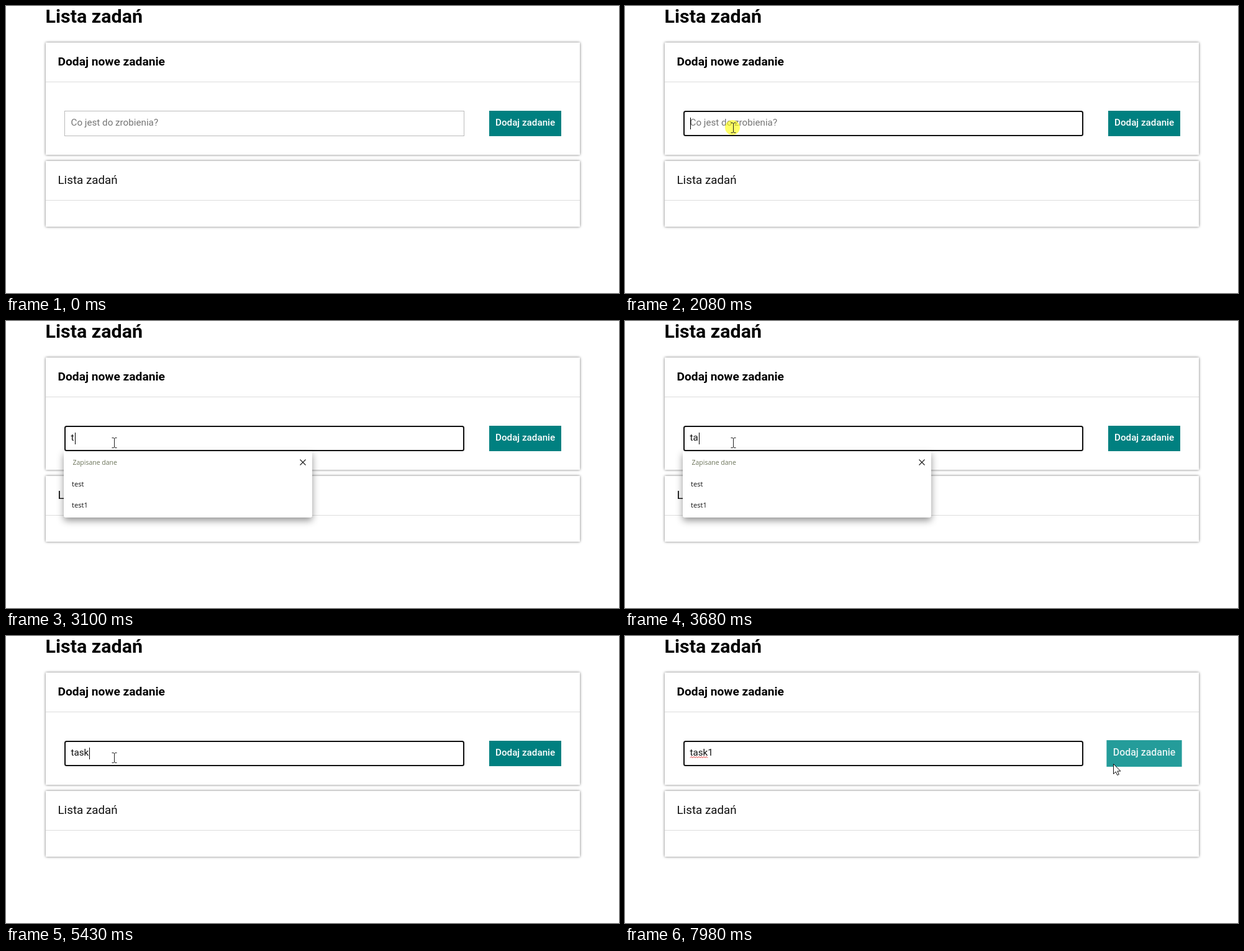
Animation of 987x463 px, one loop 8 s. Source, as an HTML page:

```html
<!DOCTYPE html>
<html lang="pl">
<head>
<meta charset="utf-8">
<title>Lista zadań</title>
<style>
  html, body { margin: 0; width: 100%; height: 100%; overflow: hidden; background: #fff; }
  svg { display: block; width: 987px; height: 463px; font: 15.2px Roboto, sans-serif; }
  .card { fill: #fff; filter: url(#cardShadow); }
  .rule { stroke: #ddd; }
  .popup text { font: 11.2px "Open Sans", sans-serif; fill: #111; }
  .popup .label { font-size: 10.5px; fill: #6c745a; }
</style>
</head>
<body>
<svg viewBox="0 0 987 463">
  <defs>
    <filter id="cardShadow" x="-5%" y="-15%" width="110%" height="130%">
      <feDropShadow dx="0" dy="0" stdDeviation="2" flood-color="#000" flood-opacity=".55"/>
    </filter>
    <filter id="popupShadow" x="-10%" y="-20%" width="120%" height="160%">
      <feDropShadow dx="0" dy="5" stdDeviation="6" flood-color="#000" flood-opacity=".42"/>
    </filter>
  </defs>

  <text x="63.5" y="27" font-size="30.4" font-weight="700">Lista zadań</text>

  <rect class="card" x="64" y="59" width="860" height="181"/>
  <path class="rule" d="M64 122.5H924"/>
  <text x="83.5" y="96" font-size="19.2" font-weight="700">Dodaj nowe zadanie</text>

  <rect class="card" x="64" y="250" width="860" height="106"/>
  <path class="rule" d="M64 313.5H924"/>
  <text x="83.5" y="287" font-size="18.8" fill="#111">Lista zadań</text>

  <rect id="idleBorder" x="94.5" y="169.5" width="643" height="40" fill="none" stroke="#767676" stroke-dasharray="1 1"/>
  <rect id="focusBorder" x="95" y="170" width="642" height="39" rx="2.5" fill="#fff" stroke="#101010" stroke-width="2"/>
  <text id="placeholder" x="104.5" y="193" fill="#757575">Co jest do zrobienia?</text>
  <text id="value" x="104.5" y="193" fill="#111"></text>
  <path id="squiggle" fill="none" stroke="#e02020"/>
  <path id="caret" d="M0 180V199" stroke="#000"/>

  <g id="button">
    <rect id="buttonFace" x="778" y="169" width="116" height="41"/>
    <text id="buttonText" x="788" y="193" font-weight="500" fill="#fff">Dodaj zadanie</text>
  </g>

  <g id="popup" class="popup">
    <path d="M93 210H493V313a4 4 0 0 1-4 4H97a4 4 0 0 1-4-4Z" fill="#fff" filter="url(#popupShadow)"/>
    <text class="label" x="107.5" y="232">Zapisane dane</text>
    <text x="106" y="267">test</text>
    <text x="106" y="301">test1</text>
    <path d="M473.5 223.5l9 9m0-9l-9 9" stroke="#222" stroke-width="1.2"/>
  </g>

  <circle id="halo" cx="173" cy="196" r="12" fill="#ffff00" opacity=".6"/>
  <path id="arrow" d="M.5 .5V16.5L4.2 13 6.7 18.5 9.3 17.3 6.9 12H12Z" fill="#fff" stroke="#111"/>
  <path id="beam" d="M-3.5-7.5H-1L.5-6.5 2-7.5H4.5M-3.5 8.5H-1L.5 7.5 2 8.5H4.5M.5-6.5V7.5" fill="none" stroke="#222"/>
</svg>
<script>
const LOOP = 8000;
const el = Object.fromEntries([...document.querySelectorAll('svg [id]')].map(n => [n.id, n]));

// [start, typed text, caret x or null]
const typing = [
  [0, '', null], [2080, '', 105.5], [2630, '', null],
  [3100, 't', 111.5], [3620, 'ta', 119.5], [3890, 'tas', 126.5],
  [4350, 'task', 134.5], [4880, 'task', null], [5430, 'task', 134.5],
  [5960, 'task1', 141.5], [6550, 'task1', null], [7010, 'task1', 141.5], [7540, 'task1', null]
];

// Stepped pointer moves; each path point is [progress, x, y]
const moves = [
  { start: 460, end: 730, steps: 4, path: [[0, 897, 440], [.4, 840, 387], [.75, 735, 410], [1, 720, 480]] },
  { start: 990, end: 1680, steps: 10, path: [[0, 417, 392], [.3, 315, 309], [.6, 230, 240], [.8, 190, 210], [1, 174, 196]] },
  { start: 7010, end: 7710, steps: 10, path: [[0, 180, 195], [.2, 290, 175], [.4, 456, 166], [.7, 660, 185], [1, 768, 213]] },
  { start: 7910, end: 7980, steps: 1, path: [[0, 777, 208], [1, 786, 206]] }
];

const between = (t, a, b) => t >= a && t < b;
const show = (node, on) => node.setAttribute('visibility', on ? 'visible' : 'hidden');
const place = (node, x, y) => node.setAttribute('transform', `translate(${x} ${y})`);
const latest = (list, t, startOf) => list.filter(item => startOf(item) <= t).pop();

function along(path, p) {
  const i = Math.max(1, path.findIndex(point => point[0] >= p));
  const [p0, x0, y0] = path[i - 1], [p1, x1, y1] = path[i];
  const k = (p - p0) / (p1 - p0);
  return [Math.round(x0 + (x1 - x0) * k), Math.round(y0 + (y1 - y0) * k)];
}

function pointerAt(t) {
  const move = latest(moves, t, m => m.start);
  if (!move) return [-50, -50];
  const p = Math.min(1, (t - move.start) / (move.end - move.start));
  return along(move.path, Math.floor(p * move.steps + 1e-6) / move.steps);
}

function drawPointer(t) {
  let [x, y] = pointerAt(t);
  const popupClosing = between(t, 3690, 3890);
  const overInput = between(x, 94, 738) && between(y, 169, 210);
  const isBeam = overInput && !popupClosing;
  if (popupClosing) x -= 2;
  place(el.arrow, x, y);
  place(el.beam, x, y);
  show(el.arrow, !isBeam);
  show(el.beam, isBeam);
}

function drawButton(hovered) {
  const scale = hovered ? 1.045 : 1;
  el.button.setAttribute('transform', `translate(836 189.5) scale(${scale}) translate(-836 -189.5)`);
  el.buttonFace.setAttribute('fill', hovered ? '#249c9a' : '#008080');
  el.buttonText.setAttribute('fill', hovered ? '#e4f3f3' : '#fff');
}

function render(t) {
  const [, text, caretX] = latest(typing, t, item => item[0]);
  const focused = t >= 2080;
  el.value.textContent = text;
  show(el.placeholder, !text);
  show(el.idleBorder, !focused);
  show(el.focusBorder, focused);
  show(el.caret, caretX !== null);
  place(el.caret, caretX ?? 0, 0);
  show(el.squiggle, t >= 5560 && !between(t, 5960, 6020));
  show(el.popup, between(t, 3100, 3690));
  show(el.halo, between(t, 2080, 2210));
  drawButton(t >= 7980);
  drawPointer(t);
}

const wave = Array.from({ length: 15 }, (_, i) => `${105 + 2 * i} ${i % 2 ? 194.5 : 196.5}`);
el.squiggle.setAttribute('d', 'M' + wave.join('L'));

const began = performance.now();
function tick() {
  render((performance.now() - began) % LOOP);
  requestAnimationFrame(tick);
}
tick();
</script>
</body>
</html>
```
